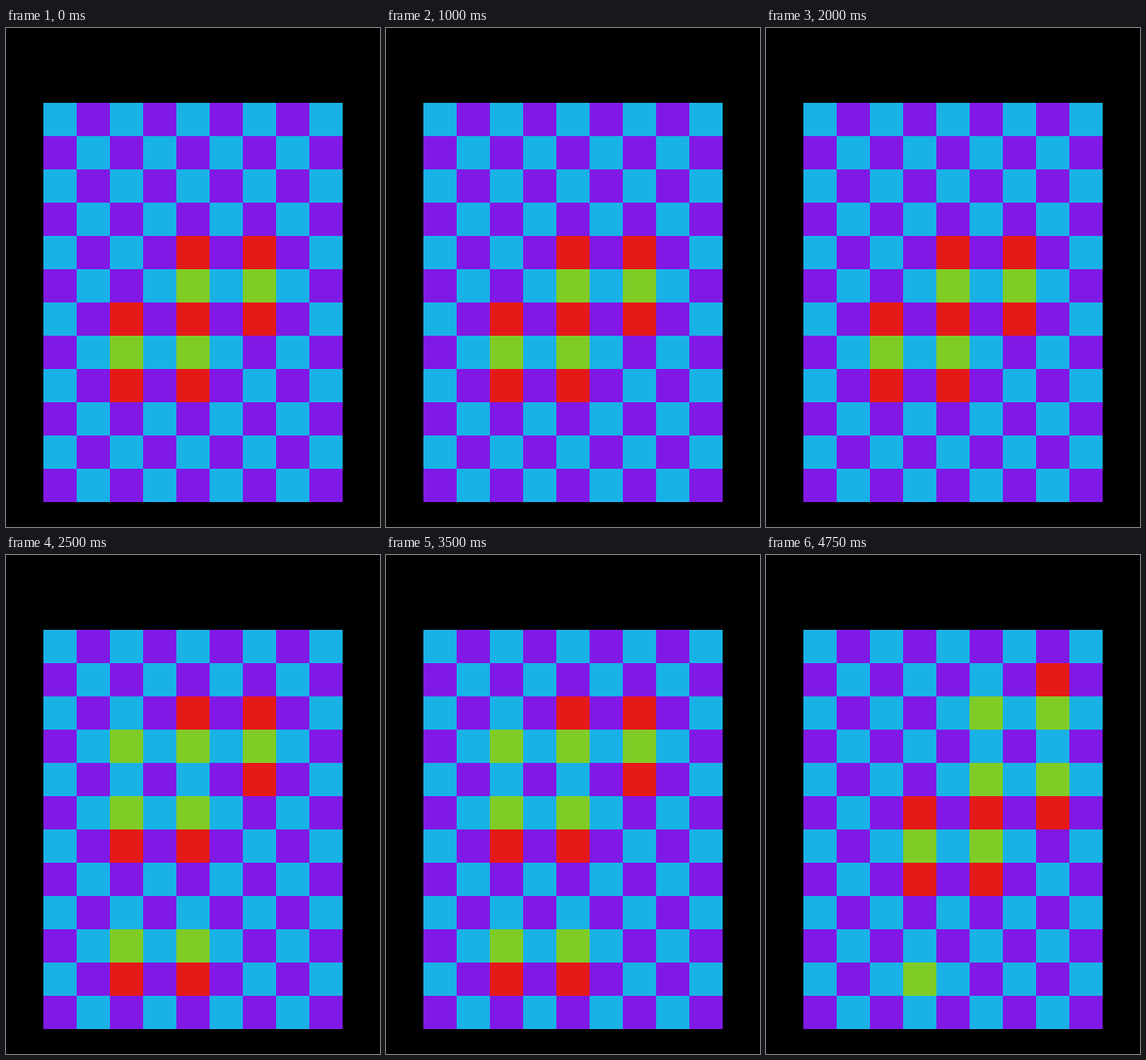
These frames come from a looping animation (450x600 px, 5000 ms). An HTML page with a canvas:

```html
<!DOCTYPE html>
<html>
<head>
<meta charset="utf-8">
<style>
  html, body { margin: 0; width: 100%; height: 100%; overflow: hidden; background: #000; }
  canvas { display: block; }
</style>
</head>
<body>
<canvas id="stage" width="450" height="600"></canvas>
<script>
const ctx = document.getElementById('stage').getContext('2d');
const CELL = 40, LEFT = 45, TOP = 90, COLS = 9, ROWS = 12;
const STEP_MS = 250;
const BOARD = ['#19b2e6', '#8019e6'];
const LIT = ['#e61919', '#80cc26'];

// Each step lists the lit columns of every row, from top to bottom.
const STEPS = [
  '||||46|46|246|24|24|||',
  '|||357|357|135|1357|7|135|135||',
  '||46|246|6|24|24|||24|24|',
  '|7|57||57|357|35|35|||3|',
].map(step => step.split('|'));

function draw(step) {
  for (let row = 0; row < ROWS; row++) {
    for (let col = 0; col < COLS; col++) {
      const palette = step[row].includes(col) ? LIT : BOARD;
      ctx.fillStyle = palette[(row + col) % 2];
      ctx.fillRect(LEFT + col * CELL, TOP + row * CELL, CELL, CELL);
    }
  }
}

const start = performance.now();
function frame() {
  const elapsed = performance.now() - start;
  draw(STEPS[Math.floor(elapsed / STEP_MS) % STEPS.length]);
  requestAnimationFrame(frame);
}
frame();
</script>
</body>
</html>
```
